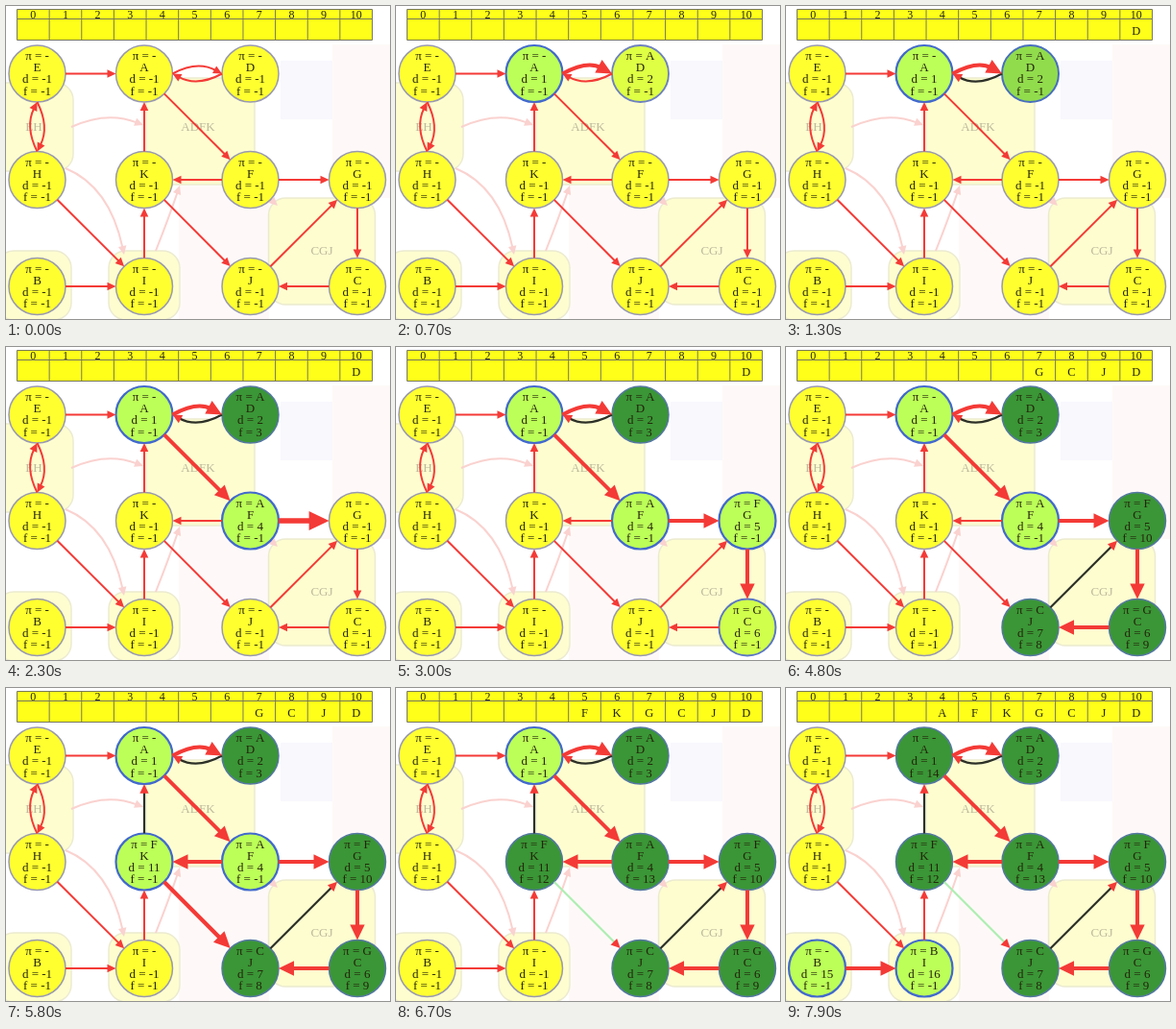
Animation, 400 px wide and 326 px high, one loop 8 s. Source, as an HTML page with a canvas:

```html
<!DOCTYPE html>
<html>
<head>
<meta charset="utf-8">
<title>Depth-first search</title>
<style>
html, body { margin: 0; width: 100%; height: 100%; overflow: hidden; background: #fff; }
canvas { display: block; }
</style>
</head>
<body>
<canvas id="stage" width="400" height="326"></canvas>
<script>
const ctx = document.getElementById('stage').getContext('2d');
const LOOP = 8000, STEP = 100, R = 29.5;
const RED = '#f43a36', BLACK = '#2c3027', MINT = '#aeeeb2';
const FONT = '"Liberation Serif", "Times New Roman", serif';
const YELLOW = [255, 255, 48], LIGHT = [188, 255, 88], DARK = [58, 150, 54];
const GREY = [153, 153, 176], BLUE = [66, 105, 205], STEEL = [84, 120, 160];

const cols = [32.5, 144, 254.5, 366], rows = [70.5, 181, 292];
const nodes = {};
['EAD ', 'HKFG', 'BIJC'].forEach((line, r) => [...line].forEach((name, c) => {
  if (name !== ' ') nodes[name] = { name, x: cols[c], y: rows[r], parent: '-' };
}));

// Discovery: node, parent, time, number
[['A', '-', 100, 1], ['D', 'A', 600, 2], ['F', 'A', 1850, 4], ['G', 'F', 2400, 5],
 ['C', 'G', 2860, 6], ['J', 'C', 3300, 7], ['K', 'F', 5100, 11], ['B', '-', 7100, 15],
 ['I', 'B', 7580, 16]
].forEach(([n, parent, found, d]) => Object.assign(nodes[n], { parent, found, d }));

// Finishing: node, time, number, slot in the list
[['D', 1200, 3, 10], ['J', 3900, 8, 9], ['C', 4080, 9, 8], ['G', 4250, 10, 7],
 ['K', 6050, 12, 6], ['F', 6350, 13, 5], ['A', 6800, 14, 4]
].forEach(([n, done, f, slot]) => Object.assign(nodes[n], { done, f, slot }));

// Edges: name, time examined, final colour (red means a tree edge), bend
const edges = [
  ['EA'], ['EH', , , 13], ['HE', , , 13], ['HI'], ['IK'],
  ['DA', 850, BLACK, 14], ['AD', 350, RED, 14], ['AF', 1600, RED], ['FG', 2150, RED],
  ['GC', 2620, RED], ['CJ', 3080, RED], ['JG', 3550, BLACK], ['FK', 4850, RED],
  ['KA', 5350, BLACK], ['KJ', 5700, MINT], ['BI', 7350, RED]
];

const clamp = u => Math.max(0, Math.min(1, u));
const lerp = (a, b, u) => a + (b - a) * u;
const mix = (a, b, u) => a.map((v, i) => lerp(v, b[i], u));
const rgb = c => `rgb(${c.map(Math.round)})`;
const progress = (t, start, length) => start === undefined ? 0 : clamp((t - start) / length);

function label(text, x, y, size, color = '#25250c') {
  ctx.font = `${size}px ${FONT}`;
  ctx.textAlign = 'center';
  ctx.fillStyle = color;
  ctx.fillText(text, x, y);
}

function ghostBox(x, y, w, h, text, tx, ty) {
  ctx.beginPath();
  ctx.roundRect(x, y, w, h, 18);
  ctx.fillStyle = '#fdfdd0';
  ctx.fill();
  ctx.strokeStyle = '#ecebd0';
  ctx.lineWidth = 1.5;
  ctx.stroke();
  label(text, tx, ty, 13, '#bdb99c');
}

function arrow(x1, y1, cx, cy, x2, y2, width, color, headColor) {
  const a = Math.atan2(y2 - cy, x2 - cx);
  const len = 3.5 * width + 2, half = len * .48;
  ctx.strokeStyle = color;
  ctx.lineWidth = width;
  ctx.beginPath();
  ctx.moveTo(x1, y1);
  ctx.quadraticCurveTo(cx, cy, x2 - Math.cos(a) * len * .8, y2 - Math.sin(a) * len * .8);
  ctx.stroke();
  ctx.save();
  ctx.translate(x2, y2);
  ctx.rotate(a);
  ctx.fillStyle = headColor;
  ctx.beginPath();
  ctx.moveTo(0, 0);
  ctx.lineTo(-len, -half);
  ctx.lineTo(-len, half);
  ctx.fill();
  ctx.restore();
}

function drawBackground() {
  ctx.fillStyle = '#fff';
  ctx.fillRect(0, 0, 400, 326);
  ctx.fillStyle = '#fef9f8';
  ctx.fillRect(180, 187, 94, 139);
  ctx.fillRect(340, 40, 60, 160);
  ctx.fillStyle = '#f8f8fd';
  ctx.fillRect(286, 57, 54, 61);
  ghostBox(-30, 80, 100, 92, 'EH', 29, 130);
  ghostBox(146, 75, 113, 111, 'ADFK', 200, 130);
  ghostBox(273.5, 200, 111, 111, 'CGJ', 329, 259);
  ghostBox(-10, 255, 78, 72, '', 0, 0);
  ghostBox(107, 255, 74, 72, '', 0, 0);
  const pink = '#fad2cf';
  [[68, 126, 105, 109, 143, 124], [62, 169, 108, 188, 123, 259],
   [156, 255, 169, 222, 181, 187], [258, 186, 270, 196, 283, 208]
  ].forEach(p => arrow(...p, 2, pink, pink));
}

function drawTable(t) {
  const x0 = 11.5, w = 370 / 11;
  ctx.fillStyle = '#ffff1a';
  ctx.fillRect(x0, 3.5, 370, 32);
  ctx.strokeStyle = '#77775c';
  ctx.lineWidth = 1;
  ctx.beginPath();
  for (const y of [3.5, 13.5, 35.5]) {
    ctx.moveTo(x0, y);
    ctx.lineTo(x0 + 370, y);
  }
  for (let i = 0; i < 12; i++) {
    ctx.moveTo(x0 + i * w, 3.5);
    ctx.lineTo(x0 + i * w, 35.5);
  }
  ctx.stroke();
  for (let i = 0; i < 11; i++) label(i, x0 + (i + .5) * w, 12.5, 12);
  for (const n of Object.values(nodes))
    if (t >= n.done) label(n.name, x0 + (n.slot + .5) * w, 29.5, 12.5);
}

function drawNode(n, t) {
  const found = progress(t, n.found, 200), done = progress(t, n.done, 300);
  ctx.beginPath();
  ctx.arc(n.x, n.y, R, 0, 2 * Math.PI);
  ctx.fillStyle = rgb(mix(mix(YELLOW, LIGHT, found), DARK, done));
  ctx.fill();
  ctx.strokeStyle = rgb(mix(mix(GREY, BLUE, found), STEEL, done));
  ctx.lineWidth = 1.5 + .7 * found - .7 * done;
  ctx.stroke();
  const seen = t >= n.found;
  [`π = ${seen ? n.parent : '-'}`, n.name, `d = ${seen ? n.d : -1}`,
   `f = ${t >= n.done + 200 ? n.f : -1}`
  ].forEach((s, i) => label(s, n.x, n.y - 14.5 + i * 12.2, 13));
}

function drawEdge([name, start, final = RED, bend = 0], t) {
  const [a, b] = [...name].map(c => nodes[c]);
  const dx = b.x - a.x, dy = b.y - a.y, d = Math.hypot(dx, dy);
  const ux = dx / d, uy = dy / d;
  const u = progress(t, start, 300);
  const rest = final === RED ? 4 : 2.2;
  const width = u < .5 ? lerp(2, 5.4, u * 2) : lerp(5.4, rest, u * 2 - 1);
  arrow(a.x + ux * R, a.y + uy * R,
    (a.x + b.x) / 2 + uy * bend, (a.y + b.y) / 2 - ux * bend,
    b.x - ux * R, b.y - uy * R, width, u === 1 ? final : RED, RED);
}

function frame(now) {
  const t = Math.floor(now % LOOP / STEP) * STEP;
  drawBackground();
  drawTable(t);
  Object.values(nodes).forEach(n => drawNode(n, t));
  edges.forEach(e => drawEdge(e, t));
  requestAnimationFrame(() => frame(performance.now() - began));
}

const began = performance.now();
frame(0);
</script>
</body>
</html>
```
